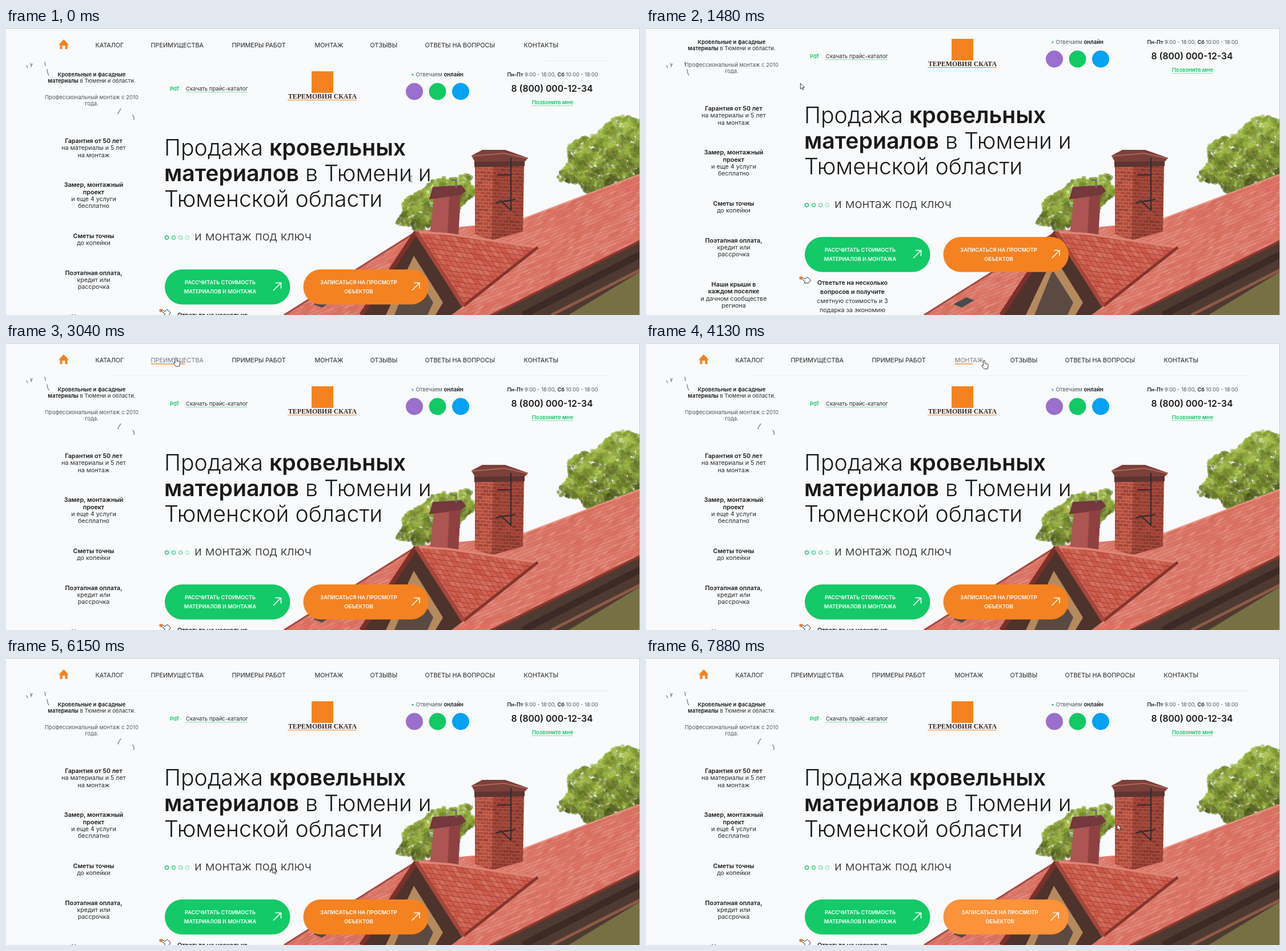
An HTML page with a canvas that plays this animation: 1110 px wide and 504 px high, repeating every 8 s.

```html
<!DOCTYPE html>
<html lang="ru">
<head>
<meta charset="utf-8">
<title>Кровельные материалы</title>
<style>
html, body { margin: 0; width: 100%; height: 100%; overflow: hidden; background: #f8fafc; }
canvas, svg { position: absolute; left: 0; top: 0; width: 1110px; height: 504px; }
text { font: 400 10.7px Inter, "Open Sans", sans-serif; fill: #2b2b2b; white-space: pre; }
.b { font-weight: 600; fill: #1a1a1a; }
.mid { text-anchor: middle; }
.small { font-size: 9.5px; }
.grey { fill: #555; }
.green { fill: #14c767; font-weight: 600; }
.nav text { font-size: 10.8px; fill: #222; }
.title { font-size: 39.2px; font-weight: 300; fill: #1a1a1a; }
.sub { font-size: 21.8px; font-weight: 300; }
.hours { font-size: 9.1px; }
.phone { font-size: 15.7px; }
.brand { font: 700 11.8px "Liberation Serif", "Noto Serif", serif; fill: #3a2723; }
.btn text { font-size: 9.1px; font-weight: 600; fill: #fff; }
.btn path { fill: none; stroke: #fff; stroke-width: 1.6; }
.dots { fill: none; stroke: #14c767; stroke-width: 1.4; }
.dotted { stroke: #14c767; stroke-dasharray: 1.5 1.5; }
.birds { fill: none; stroke: #8d9196; stroke-width: 1.6; stroke-linecap: round; }
.cursor { fill: #fff; stroke: #222; stroke-width: .9; stroke-linejoin: round; }
</style>
</head>
<body>
<canvas id="photo" width="1110" height="504"></canvas>
<svg viewBox="0 0 1110 504">
  <defs>
    <path id="hand" d="M-1.5 8V1a1.5 1.5 0 0 1 3 0V5L6 6Q7.5 6.5 7 9L6 14.5H0L-4 9.5Q-4.5 7 -1.5 8.5Z"/>
  </defs>
  <g class="birds">
    <path d="M36 66l2 4M43 62l1 5l2-4M68 60l1 6M72 73l1 6l2 4"/>
    <path id="lowBirds" d="M201 142l-3 4l-2 5M222 153l2 3v5"/>
  </g>
  <g id="page">
    <path d="M92 29.500L101 20L110 29.500H107.500V37H103.500V31H98.500V37H94.500V29.500Z" fill="#f58220"/>
    <path d="M945 57.500H1055" stroke="#e6e9ed"/>
    <path id="rule" d="M183 57.500H945" stroke="#eff2f4"/>
    <g class="nav" id="nav"></g>

    <g class="mid">
      <text class="small b" x="150" y="85">Кровельные и фасадные</text>
      <text class="small" x="150" y="96"><tspan class="b">материалы</tspan> в Тюмени и области.</text>
      <text class="small grey" x="150" y="125">Профессиональный монтаж с 2010</text>
      <text class="small grey" x="150" y="136">года.</text>
      <g id="facts"></g>
    </g>

    <text class="small green" x="287" y="110">Pdf</text>
    <text class="small" x="315" y="110" font-weight="500">Скачать прайс-каталог</text>
    <path class="dotted" d="M315 112.500H422"/>

    <rect x="535" y="76" width="38" height="38" fill="#f58220"/>
    <text class="brand mid" x="554" y="124">ТЕРЕМОВИЯ СКАТА</text>
    <path d="M493 126.500H614" stroke="#f58220"/>

    <circle cx="712" cy="82" r="1.600" fill="#14c767"/>
    <text class="small grey" x="717.500" y="85">Отвечаем <tspan class="b">онлайн</tspan></text>
    <g id="icons"></g>

    <g class="mid">
      <text class="hours grey" x="957" y="85"><tspan class="b">Пн-Пт</tspan> 9:00 - 18:00, <tspan class="b">Сб</tspan> 10:00 - 18:00</text>
      <text class="phone b" x="956" y="112">8 (800) 000-12-34</text>
      <text class="small green" x="957" y="134">Позвоните мне</text>
    </g>
    <path class="dotted" d="M921 136.500H993"/>

    <text class="title" x="277" y="223.500">Продажа <tspan class="b">кровельных</tspan></text>
    <text class="title" x="277" y="268.500"><tspan class="b">материалов</tspan> в Тюмени и</text>
    <text class="title" x="277" y="313.500">Тюменской области</text>

    <g class="dots" id="dots"></g>
    <text class="sub" x="330" y="372.500">и монтаж под ключ</text>

    <g id="buttons"></g>

    <circle cx="271" cy="496" r="2.800" fill="#f58220"/>
    <use href="#hand" class="cursor" transform="translate(273 496) rotate(-52)"/>
    <g class="mid" id="quiz"></g>
  </g>
  <path d="M0 .5H1110M1109.500 0V504" stroke="#c9cbcd"/>
  <g id="cursor" class="cursor">
    <path d="M0 0V10L2.300 8L4 11.500L5.600 10.800L4 7.400H7.200Z"/>
    <use href="#hand"/>
    <path d="M-2.500-5H2.500M0-5V5M-2.500 5H2.500" stroke="#555"/>
  </g>
</svg>
<script>
const $ = id => document.getElementById(id);
const clamp = v => Math.min(1, Math.max(0, v));
const mix = (a, b, k) => a + (b - a) * k;

// ---- photo ----
const g = $('photo').getContext('2d');
let seed = 11;
const rnd = () => (seed = seed * 16807 % 2147483647) / 2147483647;

function trace(points) {
  g.beginPath();
  points.forEach(p => g.lineTo(...p));
}
function poly(color, ...points) {
  trace(points);
  g.fillStyle = color;
  g.fill();
}
function line(color, width, ...points) {
  trace(points);
  g.strokeStyle = color;
  g.lineWidth = width;
  g.stroke();
}
// A lumpy, tilted tree crown: small leaves, lit from above.
function crown(cx, cy, rx, ry, tilt) {
  for (let n = rx * ry * .7; n > 0; n--) {
    const a = rnd() * 2 * Math.PI, d = Math.sqrt(rnd()) * (1 + .1 * Math.sin(7 * a));
    const dx = Math.cos(a) * d, dy = Math.sin(a) * d;
    const clump = Math.sin(dx * rx / 8) * Math.cos(dy * ry / 7);
    g.fillStyle = `hsla(${66 + rnd() * 14},${40 + rnd() * 15}%,${39 - 8 * dy + 8 * clump + rnd() * 16 - 8}%,.6)`;
    g.beginPath();
    g.arc(cx + dx * rx, cy + dy * ry + tilt * dx * rx, 1 + rnd() * 3, 0, 7);
    g.fill();
  }
}
// Fills a clipped shape with rows of skewed tiles: u runs along a row, v down to the next.
function tiles(shape, [ox, oy], u, v, { hue = 8, sat = 64, light, gap, stagger = 0 }) {
  const reach = 50;
  g.save();
  trace(shape);
  g.clip();
  for (let r = -reach; r < reach; r++) {
    for (let c = -reach; c < reach; c++) {
      const k = c + (r & 1) * stagger;
      const a = [ox + k * u[0] + r * v[0], oy + k * u[1] + r * v[1]];
      const b = [a[0] + u[0], a[1] + u[1]];
      const d = [a[0] + v[0], a[1] + v[1]], e = [b[0] + v[0], b[1] + v[1]];
      poly(`hsl(${hue},${sat}%,${light + rnd() * 8 - 4}%)`, a, b, e, d);
      line(gap, 1.5, d, e);
      line(gap, .7, a, d);
    }
  }
  g.restore();
}

function drawPhoto() {
  const ridge = [905, 335], right = [1110, 257], apex = [718, 358], eave = [931, 385];
  const corner = [801, 488], rake = [487, 504], gutter = [[1110, 374], [846, 506]];

  crown(1072, 220, 98, 58, -.3);
  crown(754, 306, 66, 38, -.4);

  poly('#4f3a31', ...gutter, [1110, 504]);
  poly('#777044', [1110, 428], [1110, 504], [985, 504]);
  line('#3b2a26', 12, [1110, 398], [905, 504]);
  line('#8d5a46', 5, [1110, 425], [955, 504]);

  tiles([[720, 356], [820, 347], ridge, right, ...gutter, rake], ridge, [11, -4.2], [-6, 8],
    { light: 65, gap: '#c9665a' });
  line('#eb9a88', 2, ridge, right);
  line('#8b3730', 4, ...gutter);
  line('#a34a40', 3, apex, rake);
  poly('#474b4c', [538, 485], [561, 473], [575, 478], [553, 491]);

  // small chimney
  poly('#ad5552', [749, 300], [796, 290], [792, 363], [742, 360]);
  poly('#8f4142', [776, 296], [796, 290], [792, 363], [773, 362]);
  poly('#75383c', [741, 301], [747, 279], [797, 276], [806, 286], [797, 293]);
  line('#6c7073', 3, [780, 267], [788, 267], [788, 280]);

  // tall chimney
  const shade = [[853, 240], [907, 236], [905, 357], [850, 373]];
  tiles([[821, 238], ...shade.slice(1), [821, 362]], [815, 232], [10, .5], [0, 6],
    { light: 46, sat: 50, gap: '#cf8674', stagger: .5 });
  poly('rgba(70,15,15,.25)', ...shade);
  line('#5d3431', 11, [820, 239], [908, 237]);
  poly('#7b4039', [815, 224], [834, 214], [874, 214], [914, 228], [909, 234], [821, 235]);
  line('#a7675a', 2, [815, 225], [872, 220], [914, 229]);
  line('#2d2b30', 2.2, [860, 258], [884, 258], [884, 320], [866, 303]);
  line('#2d2b30', 2.2, [857, 307], [892, 301]);
  line('#2d2b30', 2.2, [884, 228], [884, 260]);

  // dormer
  poly('#4d332c', apex, corner, [780, 504], [625, 504]);
  poly('#b58a5e', [714, 400], [765, 482], [752, 504], [665, 504]);
  poly('#5b4a42', [712, 425], [748, 482], [738, 504], [680, 504]);
  tiles([apex, [775, 362], eave, corner], apex, [10, 1.3], [6, 9.5], { light: 57, sat: 58, gap: '#8e352d' });
  line('#dd8574', 4, apex, [775, 362], eave);
  line('#84352e', 5, eave, corner);
  line('#7c302a', 8, apex, [622, 504]);
  line('#a8463b', 7, apex, corner);
}
drawPhoto();

// ---- page parts ----
const NAV_GAP = 47;
const navX = [157, 254, 396, 541, 638, 734, 907, 1014];
const nav = ['КАТАЛОГ', 'ПРЕИМУЩЕСТВА', 'ПРИМЕРЫ РАБОТ', 'МОНТАЖ', 'ОТЗЫВЫ', 'ОТВЕТЫ НА ВОПРОСЫ', 'КОНТАКТЫ']
  .map((label, i) => ({ label, x: navX[i], width: navX[i + 1] - NAV_GAP - navX[i] }));
$('nav').innerHTML = nav.map(n =>
  `<text x="${n.x - .5}" y="34">${n.label}</text><rect x="${n.x - .5}" y="36" height="1.3" fill="#f58220"/>`).join('');

// Lines that begin with * are bold.
const rowsOf = (rows, x, y, step) => rows.map((s, i) =>
  `<text class="${s[0] === '*' ? 'b' : ''}" x="${x}" y="${y + i * step}">${s.replace('*', '')}</text>`).join('');

let factY = 202;
$('facts').innerHTML = [
  ['*Гарантия от 50 лет', 'на материалы и 5 лет', 'на монтаж'],
  ['*Замер, монтажный', '*проект', 'и еще 4 услуги', 'бесплатно'],
  ['*Сметы точны', 'до копейки'],
  ['*Поэтапная оплата,', 'кредит или', 'рассрочка'],
  ['*Наши крыши в', '*каждом поселке', 'и дачном сообществе', 'региона']
].map(rows => {
  const html = rowsOf(rows, 153.5, factY, 12.4);
  factY += rows.length * 12.4 + 40;
  return html;
}).join('');

$('quiz').innerHTML = rowsOf(
  ['*Ответьте на несколько', '*вопросов и получите', 'сметную стоимость и 3', 'подарка за экономию'], 361.5, 507.5, 16);

const iconX = i => 715 + i * 40.5;
$('icons').innerHTML = ['#9a6fcd', '#12c964', '#04a2f2'].map((c, i) =>
  `<circle cx="${iconX(i)}" cy="111.500" r="15" fill="${c}"/>`).join('');
$('dots').innerHTML = [0, 1, 2, 3].map(i =>
  `<circle cx="${281.5 + i * 12}" cy="368" r="3" opacity="${1 - i * .22}"/>`).join('');

const buttons = [
  { x: 278, rows: ['РАССЧИТАТЬ СТОИМОСТЬ', 'МАТЕРИАЛОВ И МОНТАЖА'], from: [20, 201, 104], to: [35, 229, 127] },
  { x: 520.5, rows: ['ЗАПИСАТЬСЯ НА ПРОСМОТР', 'ОБЪЕКТОВ'], from: [245, 130, 32], to: [252, 146, 58] }
];
$('buttons').innerHTML = buttons.map(b => `<g class="btn">
  <rect x="${b.x}" y="424" width="219.500" height="61.500" rx="30.700"/>
  <g class="mid">${rowsOf(b.rows, b.x + 97, 450, 16)}</g>
  <path d="M${b.x + 190} 461l13.500-13.500m-10 0h10v10"/></g>`).join('');

// ---- motion: the picture changes on a fixed beat ----
const LOOP = 8000, FIRST = 148, BEAT = 132.7, FADE = 210, LAST = 58;

// Cursor way points: beat, x, y.
const path = [
  [-1, 709, 265], [4, 277, 97], [13, 267, 97], [18, 185, 28], [26, 485, 24], [30, 592, 31], [32, 685, 30],
  [35, 737, 117], [38, 807, 117], [45, 467, 368], [47, 430, 440], [49, 472, 453], [50, 440, 450], [51, 530, 455],
  [57, 725, 430], [LAST, 825, 292]
];
function cursorAt(beat) {
  const i = Math.max(1, path.findIndex(p => p[0] >= beat));
  const [a, ax, ay] = path[i - 1], [b, bx, by] = path[i];
  const k = (beat - a) / (b - a);
  return [mix(ax, bx, k), mix(ay, by, k)];
}
const scrollAt = beat => 57 * (clamp((beat - 4) / 3) - clamp((beat - 11) / 2));

const targets = [
  ...nav.map(n => (x, y) => x >= n.x && x <= n.x + n.width + 1 && y > 20 && y < 40),
  ...buttons.map(b => (x, y) => x > b.x && x < b.x + 220 && y > 424 && y < 485)
];
const onIcon = (x, y) => [0, 1, 2].some(i => Math.hypot(x - iconX(i), y - 111.5) < 15);
const onTitle = (x, y) => x > 278 && x < 745 && y > 190 && y < 322;

const states = [];
for (let beat = -1; beat <= LAST; beat++) {
  const [x, y] = cursorAt(beat), prev = states[beat];
  const hits = targets.map(hit => hit(x, y));
  const levels = hits.map((_, i) => prev ? clamp(prev.levels[i] + (prev.hits[i] ? 1 : -1) * BEAT / FADE) : 0);
  const shape = hits.includes(true) || onIcon(x, y) ? 1 : onTitle(x, y) ? 2 : 0;
  states.push({ beat, x, y, hits, levels, shape });
}

const links = $('nav').querySelectorAll('text'), lines = $('nav').querySelectorAll('rect');
const btns = document.querySelectorAll('.btn'), shapes = [...$('cursor').children];

function show(s) {
  const scroll = scrollAt(s.beat);
  $('page').setAttribute('transform', `translate(0 ${-scroll})`);
  $('lowBirds').style.opacity = scroll ? 0 : 1;
  $('rule').style.opacity = s.beat > 18 ? 1 : 0;
  $('cursor').setAttribute('transform', `translate(${s.x} ${s.y})`);
  shapes.forEach((el, i) => el.style.display = i === s.shape ? '' : 'none');
  nav.forEach((n, i) => {
    links[i].style.fill = s.hits[i] ? '#777' : '#222';
    lines[i].setAttribute('width', n.width * s.levels[i]);
  });
  buttons.forEach((b, i) => {
    const k = s.levels[nav.length + i], [box, label, arrow] = btns[i].children;
    box.style.fill = `rgb(${b.from.map((c, j) => Math.round(mix(c, b.to[j], k)))})`;
    label.setAttribute('transform', `translate(${2 * k} 0)`);
    arrow.setAttribute('transform', `translate(${-2 * k} 0)`);
  });
}

let current;
function tick() {
  const beat = Math.floor((performance.now() % LOOP - FIRST) / BEAT);
  const s = states[Math.min(beat, LAST) + 1] || states[0];
  if (s !== current) show(current = s);
  requestAnimationFrame(tick);
}
tick();
</script>
</body>
</html>
```
